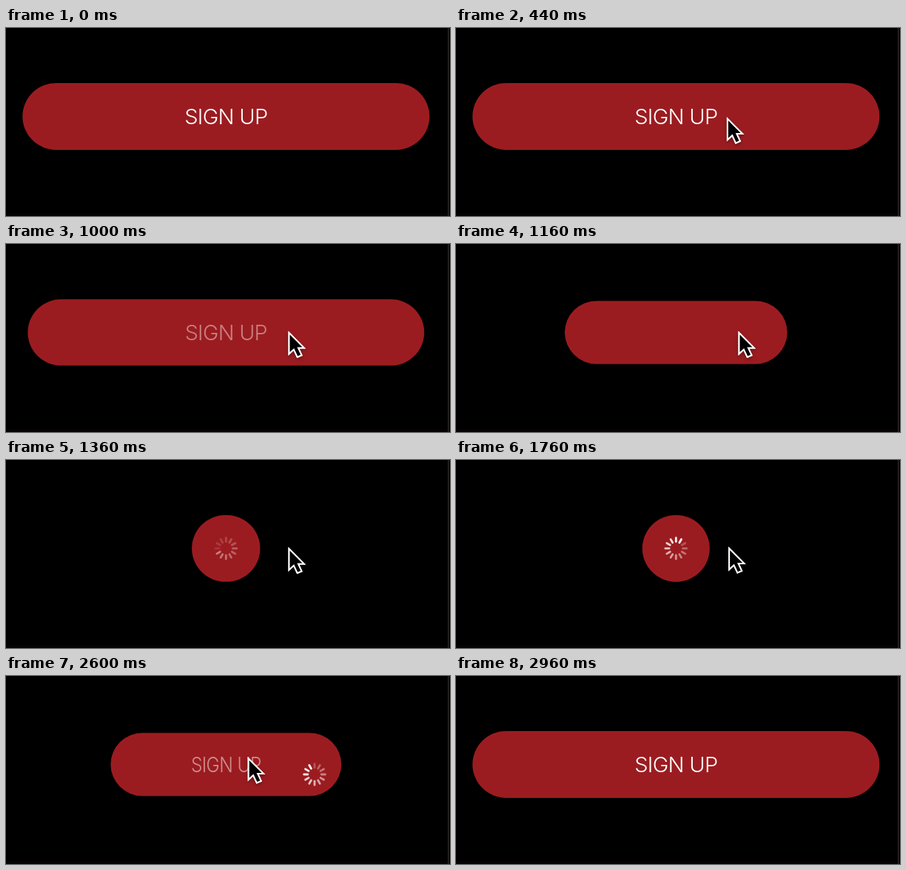
An HTML page with a canvas that plays this animation: 600x256 px, repeating every 3520 ms.

```html
<!DOCTYPE html>
<html lang="en">
<head>
<meta charset="utf-8">
<title>Sign up button</title>
<style>
  html, body { margin: 0; width: 100%; height: 100%; overflow: hidden; background: #000; }
  canvas { display: block; width: 600px; height: 256px; }
</style>
</head>
<body>
<canvas id="stage" width="600" height="256"></canvas>
<script>
const ctx = document.getElementById('stage').getContext('2d');
const LOOP = 3520, STEP = 40;
const CX = 297.3, CY = 120.4;
const WIDE = 550, ROUND = 91;
const ARROW = new Path2D('M0 0V28.6L6.4 22.6L11.2 33L17 30.4L12.4 20.4H20.2Z');

const clamp = v => Math.min(1, Math.max(0, v));
const span = (t, from, to) => clamp((t - from) / (to - from));
const mix = (a, b, p) => a + (b - a) * p;
const smooth = p => p * p * (3 - 2 * p);
const easeOut = p => 1 - (1 - p) ** 2;
const cubicInOut = p => p < .5 ? 4 * p ** 3 : 1 - 4 * (1 - p) ** 3;

// Share of the full width: 1 is the wide button, 0 the circle.
function openness(t) {
  if (t < 2600) {
    const press = .007 * Math.sin(Math.PI * span(t, 880, 1000));
    return 1 + press - cubicInOut(span(t, 900, 1405));
  }
  if (t >= 2960) return 1;
  const s = t - 2600;
  return 1 - .519 * Math.exp(-s / 69) * Math.cos(Math.PI * s / 220);
}

function drawButton(open) {
  const w = mix(ROUND, WIDE, open);
  const h = ROUND - 20 * open * (1 - open);
  ctx.fillStyle = '#9b1c20';
  ctx.beginPath();
  ctx.roundRect(CX - w / 2, CY - h / 2, w, h, h / 2);
  ctx.fill();
}

function drawLabel(t, open) {
  const alpha = t < 2600 ? 1 - span(t, 900, 1080) : mix(.5, 1, span(t, 2600, 2760));
  if (!alpha) return;
  ctx.save();
  ctx.globalAlpha = alpha;
  ctx.translate(CX, 131);
  ctx.scale(.7 + .3 * open, 1);
  ctx.font = '300 29px Inter, "Liberation Sans", sans-serif';
  ctx.letterSpacing = '-0.7px';
  ctx.textAlign = 'center';
  ctx.fillStyle = '#fff';
  ctx.fillText('SIGN UP', 0, 0);
  ctx.restore();
}

function drawSpinner(t) {
  const alpha = span(t, 1300, 1440) * (1 - span(t, 2600, 2760));
  if (!alpha) return;
  const head = Math.floor(t / (1000 / 12) + 4.18);
  ctx.save();
  if (t < 2600) ctx.translate(CX, CY);
  else ctx.translate(417, 134);
  ctx.strokeStyle = '#fff';
  ctx.lineWidth = 2.8;
  ctx.lineCap = 'round';
  for (let i = 0; i < 12; i++) {
    const age = (head - i + 12) % 12;
    ctx.globalAlpha = alpha * (1 - .068 * age);
    ctx.beginPath();
    ctx.moveTo(0, -9.2);
    ctx.lineTo(0, -14.4);
    ctx.stroke();
    ctx.rotate(Math.PI / 6);
  }
  ctx.restore();
}

function cursorAt(t) {
  if (t < 640) {
    const p = easeOut(span(t, 60, 600));
    return [mix(532, 351, p), mix(244, 112, p)];
  }
  if (t < 1560) {
    const p = smooth(span(t, 600, 760));
    return [mix(351, 382.5, p), mix(112, 121, p)];
  }
  if (t <= 2600) {
    const p = smooth(span(t, 1580, 2140));
    return [mix(382.5, 327.7, p), mix(121, 112.5, p * p)];
  }
  const p = span(t, 2600, 2940) ** 1.5;
  return [mix(327.7, 410, p), mix(112.5, -40, p)];
}

function drawCursor(t) {
  if (t < 80 || t >= 2960) return;
  ctx.save();
  ctx.translate(...cursorAt(t));
  ctx.lineWidth = 2;
  ctx.lineJoin = 'miter';
  ctx.strokeStyle = '#fff';
  ctx.fillStyle = '#000';
  ctx.shadowColor = 'rgba(0,0,0,.45)';
  ctx.shadowBlur = 4;
  ctx.shadowOffsetY = 2;
  ctx.stroke(ARROW);
  ctx.shadowColor = 'transparent';
  ctx.fill(ARROW);
  ctx.stroke(ARROW);
  ctx.restore();
}

function draw(t) {
  ctx.fillStyle = '#000';
  ctx.fillRect(0, 0, 600, 256);
  ctx.fillStyle = '#060204';
  ctx.fillRect(0, 252, 600, 4);
  ctx.fillStyle = '#2b2824';
  ctx.fillRect(597, 0, 1.5, 256);
  const open = openness(t);
  drawButton(open);
  drawLabel(t, open);
  drawSpinner(t);
  drawCursor(t);
}

const start = performance.now();
function tick() {
  const t = (performance.now() - start) % LOOP;
  draw(Math.floor(t / STEP) * STEP);
  requestAnimationFrame(tick);
}
tick();
</script>
</body>
</html>
```
